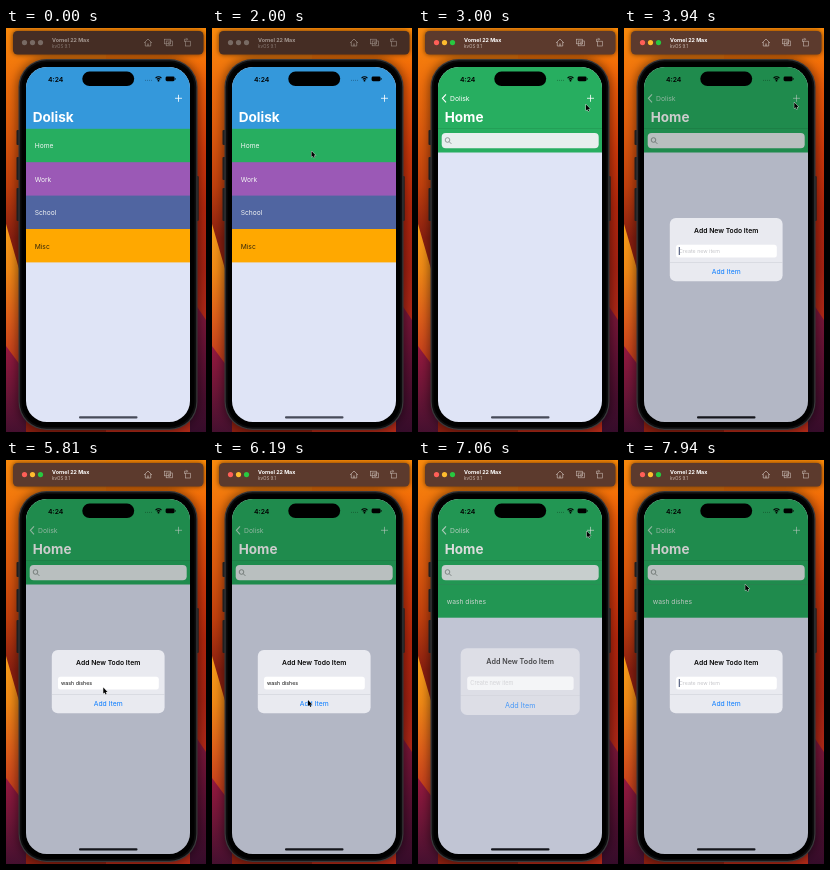
These frames come from a looping animation (200x404 px, 8 s). An HTML page with a canvas:

```html
<!DOCTYPE html>
<html lang="en">
<head>
<meta charset="utf-8">
<style>
html, body { margin: 0; width: 100%; height: 100%; overflow: hidden; background: #000; }
canvas { display: block; width: 200px; height: 404px; }
</style>
</head>
<body>
<canvas id="stage"></canvas>
<script>
const W = 200, H = 404, LOOP = 8000;
const canvas = document.getElementById('stage');
const ctx = canvas.getContext('2d');
const dpr = window.devicePixelRatio || 1;
canvas.width = W * dpr;
canvas.height = H * dpr;

const SCREEN = { x: 20, y: 39, w: 164, h: 355 };
const ROW = 33.4;
const GREEN = '#27ae60', BLUE = '#3498db', PAPER = '#dfe4f6';
const APP = 'Dolisk', DEVICE = 'Vornel 22 Max', SYSTEM = 'kvOS 9.1';
const ITEM = 'wash dishes';
const CATEGORIES = [['Home', GREEN], ['Work', '#9b59b6'], ['School', '#5065a1'], ['Misc', '#ffa800']];

const CLICK = 2060, PUSH = [2090, 2460], ADDED = 6200, TYPE_START = 4190, KEY_TIME = 75, FADE = 220;
const ALERTS = [
  { open: 3290, close: ADDED, caret: 3700, typed: true },
  { open: 6990, close: LOOP, caret: 7700, typed: false }
];
const POINTER = [
  [900, 104, 412], [1750, 99.5, 123], [2130, 99.5, 123], [2500, 137.7, 102.6],
  [3100, 170.3, 74.4], [5250, 170.3, 74.4], [5810, 97.3, 227.5], [6000, 96, 240],
  [6250, 96, 240], [6780, 171.6, 68], [6980, 171.6, 68], [7540, 121.3, 124.5]
];

const clamp = v => Math.max(0, Math.min(1, v));
const span = (t, a, b) => clamp((t - a) / (b - a));
const easeOut = p => 1 - (1 - p) ** 3;
const easeInOut = p => p * p * (3 - 2 * p);
const mix = (a, b, p) => a + (b - a) * p;

function rect(x, y, w, h, color) {
  ctx.fillStyle = color;
  ctx.fillRect(x, y, w, h);
}

function round(x, y, w, h, r, color) {
  ctx.beginPath();
  ctx.roundRect(x, y, w, h, r);
  ctx.fillStyle = color;
  ctx.fill();
}

function shadowed(blur, paint) {
  ctx.save();
  ctx.shadowColor = 'rgba(0,0,0,.6)';
  ctx.shadowBlur = blur * dpr;
  paint();
  ctx.restore();
}

function circle(x, y, r, color) {
  ctx.beginPath();
  ctx.arc(x, y, r, 0, 7);
  ctx.fillStyle = color;
  ctx.fill();
}

function line(points, color, width) {
  ctx.beginPath();
  points.forEach(([x, y]) => ctx.lineTo(x, y));
  ctx.strokeStyle = color;
  ctx.lineWidth = width;
  ctx.stroke();
}

function text(s, x, y, size, color, weight = 400, align = 'left') {
  ctx.font = `${weight} ${size}px Inter, sans-serif`;
  ctx.textAlign = align;
  ctx.fillStyle = color;
  ctx.fillText(s, x, y);
}

function verticalGradient(y0, y1, colors) {
  const g = ctx.createLinearGradient(0, y0, 0, y1);
  colors.forEach((c, i) => g.addColorStop(i / (colors.length - 1), c));
  return g;
}

function band(points, fill) {
  ctx.beginPath();
  points.forEach(([x, y]) => ctx.lineTo(x, y));
  ctx.fillStyle = fill;
  ctx.fill();
}

function drawWallpaper() {
  rect(0, 0, 100, H, verticalGradient(0, 210, ['#f98a0c', '#f0700c', '#dc5a0d', '#c2400d', '#8c1f10']));
  band([[0, 196], [20, 265], [20, H], [0, H]],
    verticalGradient(196, 335, ['#f9a01a', '#f28a16', '#e0601a', '#c23a1c']));
  band([[0, 318], [20, 345], [20, H], [0, H]], verticalGradient(318, H, ['#98193f', '#701638', '#45102f']));
  rect(100, 0, 100, H, verticalGradient(0, 300, ['#fd8a06', '#ec5a08', '#d23a0a', '#b5260c', '#a82212', '#b42a18']));
  band([[184, 268], [200, 292], [200, H], [184, H]], verticalGradient(268, H, ['#86183a', '#5c1033', '#360c2a']));
}

function drawToolbar(active) {
  shadowed(5, () => round(7, 3, 190.5, 23.5, 4.5, active ? '#5c3a2d' : '#452d24'));
  const lights = active ? ['#ff5f57', '#febc2e', '#28c840'] : ['#786a63', '#786a63', '#786a63'];
  lights.forEach((c, i) => circle(18.5 + 8 * i, 14.6, 2.6, c));
  text(DEVICE, 46, 14.2, 5.3, active ? '#fff' : '#a3968f', 700);
  text(SYSTEM, 46, 20, 4.5, active ? '#c9bab2' : '#887a73');

  const c = active ? '#c3b5ae' : '#9b8d85';
  line([[138, 15], [142, 11], [146, 15]], c, 0.7);
  line([[139.3, 14], [139.3, 18], [144.7, 18], [144.7, 14]], c, 0.7);
  line([[142, 18], [142, 15.5]], c, 1);
  ctx.lineWidth = 0.6;
  ctx.strokeRect(158.5, 11.2, 6, 4.6);
  ctx.strokeRect(160.2, 13, 6.3, 4.8);
  ctx.beginPath();
  ctx.arc(163.3, 15.4, 1.1, 0, 7);
  ctx.stroke();
  ctx.strokeRect(179.5, 13.2, 4.8, 4.8);
  line([[178.5, 14], [178.5, 11.2], [181.5, 11.2]], c, 0.6);
  line([[180.3, 9.9], [181.6, 11.2], [180.3, 12.5]], c, 0.6);
}

function drawPhone() {
  const rim = '#29292b';
  [[102, 15], [129, 23], [160, 33]].forEach(([y, h]) => round(10.5, y, 4, h, 1, rim));
  round(188.7, 148, 4, 45, 1, rim);
  shadowed(12, () => round(12.5, 31, 179, 371, 28, '#39393b'));
  round(13.7, 32.2, 176.6, 368.6, 27, '#0c0c0d');
  round(15.5, 34, 173, 365, 25, '#000');
}

function drawCategories() {
  rect(20, 39, 164, 355, PAPER);
  rect(20, 39, 164, 62, BLUE);
  CATEGORIES.forEach(([name, color], i) => {
    const y = 100.8 + ROW * i, isLast = i === CATEGORIES.length - 1;
    rect(20, y, 164, isLast ? ROW : ROW + 1, color);
    text(name, 28.7, y + 19.6, 6.7, isLast ? '#35280c' : '#f3f5f4');
  });
}

function drawItems(hasItem) {
  rect(20, 39, 164, 355, PAPER);
  rect(20, 39, 164, 85.5, GREEN);
  rect(20, 100.3, 164, 0.5, '#1f914f');
  round(23.7, 105, 157, 15.2, 4, '#e7efee');
  ctx.beginPath();
  ctx.arc(29.5, 112, 2.3, 0, 7);
  ctx.strokeStyle = '#7d8784';
  ctx.lineWidth = 0.8;
  ctx.stroke();
  line([[31.2, 113.7], [33.4, 115.9]], '#7d8784', 0.8);
  if (hasItem) {
    rect(20, 124.3, 164, ROW, GREEN);
    rect(20, 124.1, 164, 0.5, '#1f914f');
    text(ITEM, 28.7, 143.8, 6.7, '#e9f5ee');
  }
}

function drawNavigation(push, tint, plusAlpha) {
  // The large title shrinks into the back button during the push.
  text(APP, mix(26.7, 32, push), mix(94.3, 73, push), mix(13.6, 6.8, push),
    `rgba(255,255,255,${tint})`, push < 0.6 ? 700 : 400);
  if (push > 0) {
    line([[28, 66.3], [24.4, 70.3], [28, 74.3]], `rgba(255,255,255,${push * tint})`, 1.1);
    text('Home', 26.7 + 164 * (1 - push), 94.3, 13.5, '#fff', 700);
  }
  const plus = `rgba(255,255,255,${plusAlpha * tint})`;
  line([[169, 70.3], [176, 70.3]], plus, 0.8);
  line([[172.5, 66.8], [172.5, 73.8]], plus, 0.8);
}

function drawStatus(indicator) {
  text('4:24', 42, 53.5, 6.8, '#000', 600);
  round(76.3, 43.6, 51.9, 14.4, 7.2, '#000');
  for (let i = 0; i < 4; i++) circle(139.5 + 2 * i, 52.2, 0.55, 'rgba(0,0,0,.35)');
  ctx.strokeStyle = '#000';
  ctx.lineWidth = 1.1;
  for (const r of [2.4, 4.2]) {
    ctx.beginPath();
    ctx.arc(152.5, 53, r, Math.PI * 1.25, Math.PI * 1.75);
    ctx.stroke();
  }
  circle(152.5, 52.7, 0.9, '#000');
  round(159.6, 48.6, 9, 4.6, 1.4, '#000');
  rect(169, 50.1, 0.6, 1.6, '#000');
  round(73, 388.3, 58.5, 2.1, 1, indicator);
}

function drawAlert(shown, scale, typed, caret) {
  rect(20, 39, 164, 355, `rgba(0,0,0,${0.2 * shown})`);
  ctx.save();
  ctx.globalAlpha = shown;
  ctx.translate(102.2, 221.5);
  ctx.scale(scale, scale);
  ctx.translate(-102.2, -221.5);
  round(45.8, 190, 112.8, 63.2, 6, '#e9eaf0');
  text('Add New Todo Item', 102.2, 205.2, 6.8, '#050505', 600, 'center');
  round(52, 216.8, 100.8, 12.8, 2.5, '#fff');
  text(typed || 'Create new item', 55, 225.2, 5.3, typed ? '#111' : '#c5c5c9');
  ctx.globalAlpha = shown * caret;
  rect(54.8, 219, 0.9, 8, '#27355f');
  ctx.globalAlpha = shown;
  rect(45.8, 234.5, 112.8, 0.5, '#c9cad2');
  text('Add Item', 102.2, 246.4, 6.8, '#087bff', 400, 'center');
  ctx.restore();
}

function drawPointer(t) {
  if (t < POINTER[0][0]) return;
  let i = POINTER.findIndex(p => p[0] > t);
  if (i < 0) i = POINTER.length - 1;
  const [t0, x0, y0] = POINTER[i - 1], [t1, x1, y1] = POINTER[i];
  const p = easeInOut(span(t, t0, t1));
  ctx.save();
  ctx.translate(mix(x0, x1, p), mix(y0, y1, p));
  ctx.beginPath();
  [[0, 0], [0, 6], [1.4, 4.9], [2.3, 6.9], [3.2, 6.5], [2.4, 4.5], [4.2, 4.4]]
    .forEach(([x, y]) => ctx.lineTo(x, y));
  ctx.closePath();
  ctx.fillStyle = '#000';
  ctx.strokeStyle = '#e8e8e8';
  ctx.lineWidth = 0.8;
  ctx.stroke();
  ctx.fill();
  ctx.restore();
}

function typedText(t) {
  const count = Math.floor((t - TYPE_START) / KEY_TIME) + 1;
  return ITEM.slice(0, Math.max(0, count));
}

function drawScreen(t) {
  const { x, y, w, h } = SCREEN;
  const push = easeOut(span(t, ...PUSH));
  const alert = ALERTS.find(a => t >= a.open && t < a.close + FADE);
  const opening = alert ? easeOut(span(t, alert.open, alert.open + FADE)) : 0;
  const shown = alert ? opening * (1 - span(t, alert.close, alert.close + FADE)) : 0;
  ctx.save();
  ctx.beginPath();
  ctx.roundRect(x, y, w, h, 21);
  ctx.clip();

  if (push < 1) {
    ctx.save();
    ctx.translate(-0.3 * w * push, 0);
    drawCategories();
    ctx.restore();
  }
  if (push > 0) {
    ctx.save();
    ctx.translate(w * (1 - push), 0);
    drawItems(t >= ADDED);
    ctx.restore();
  }
  const pressed = ALERTS.some(a => t > a.open - 100 && t < a.open + 40);
  drawNavigation(push, 1 - 0.35 * shown, pressed ? 0.1 : 1);

  if (alert) {
    const typed = alert.typed ? typedText(t) : '';
    const caret = typed ? 0 : span(t, alert.caret, alert.caret + 200);
    drawAlert(shown, mix(1.18, 1, opening), typed, caret);
  }
  drawStatus(t < ALERTS[0].open ? '#474b59' : '#15161c');
  ctx.restore();
}

function draw(t) {
  ctx.setTransform(dpr, 0, 0, dpr, 0, 0);
  drawWallpaper();
  drawPhone();
  drawToolbar(t >= CLICK);
  drawScreen(t);
  drawPointer(t);
}

const start = performance.now();
function tick() {
  draw((performance.now() - start) % LOOP);
  requestAnimationFrame(tick);
}
tick();
</script>
</body>
</html>
```
